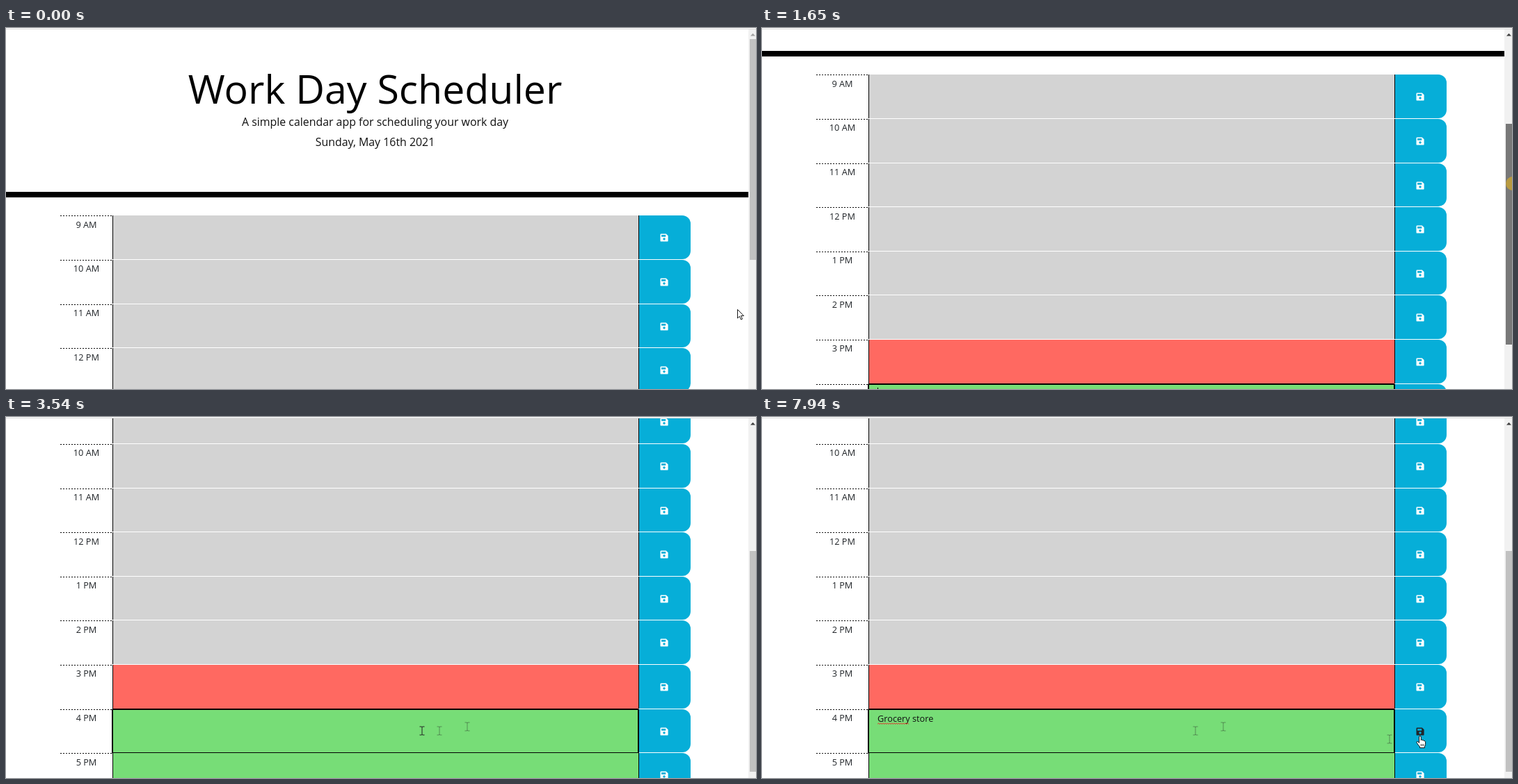
Write an HTML page that moves like this. It is 1078x520 px and loops after 8000 ms.

```html
<!DOCTYPE html>
<html lang="en">
<head>
<meta charset="utf-8">
<title>Work Day Scheduler</title>
<style>
  html, body { margin: 0; width: 100%; height: 100%; overflow: hidden; background: #fff; }
  body, body * { box-sizing: border-box; }
  #stage {
    position: relative; width: 1078px; height: 520px; overflow: hidden;
    font: 12.72px "Open Sans", sans-serif; color: #212529;
  }
  #stage div, #stage svg, #stage i { position: absolute; }
  #edge { left: 0; top: 1px; width: 100%; height: 1px; background: #dcdcdc; }
  #view { left: 0; top: 2px; width: 1067px; bottom: 0; overflow: hidden; }
  #page { left: 0; width: 1067px; height: 900px; }
  .head { width: 1061px; left: 0; text-align: center; white-space: nowrap; color: #111; }
  .title { top: 48px; font-size: 57.2px; line-height: 78px; color: #000; }
  .sub { font-size: 15.9px; line-height: 22px; }
  .bar { top: 236px; width: 100%; height: 8px; background: #000; }

  .row { left: 0; width: 100%; height: 62.6px; }
  .hour {
    left: 78px; top: 0; width: 75px; height: 100%; padding-top: 4.4px;
    text-align: center; line-height: 17.3px;
  }
  .hour::before {
    content: ""; position: absolute; left: 0; top: 0; width: 100%; height: 1px;
    background: repeating-linear-gradient(90deg, #000 0 2.4px, #0000 2.4px 4px);
  }
  .field { left: 153px; top: 0; width: 757px; height: 100%; border: solid #000; border-width: 0 1px; }
  .past { background: #d3d3d3; }
  .present { background: #ff6961; }
  .future { background: #77dd77; }
  .save { left: 910px; top: 0; width: 74px; height: 100%; border-radius: 0 12px 12px 0; background: #06aed8; }
  .save svg { left: 30px; top: 26px; fill: #fff; }
  .focus { left: 152px; top: -1px; width: 758px; height: 65px; border: 2px solid #000; border-radius: 2px; }
  #stage .entry { left: 166px; top: 5.4px; display: flex; white-space: pre; line-height: 17.3px; color: #111; }
  #stage #caret { position: static; width: 1px; height: 17px; background: #000; }
  #wave { left: 166px; top: 18px; fill: none; stroke: #e22; stroke-width: .9; }

  #track { left: 1067px; top: 2px; width: 11px; bottom: 0; background: #f1f1f1; }
  #up { left: 3px; top: 5px; }
  #thumb { left: 2px; width: 9px; height: 318px; }
  #press { left: 1069px; width: 20px; height: 20px; border-radius: 50%; background: rgba(226, 176, 28, .6); }
  .cursor { overflow: visible; }
</style>
</head>
<body>
<div id="stage">
  <div id="view">
    <div id="page">
      <div class="head title">Work Day Scheduler</div>
      <div class="head sub" style="top:124px">A simple calendar app for scheduling your work day</div>
      <div class="head sub" style="top:153px">Sunday, May 16th 2021</div>
      <div class="bar"></div>
    </div>
  </div>
  <div id="track">
    <svg id="up" width="7" height="5"><path d="M0 4.5 3.5 .8 7 4.5z"/></svg>
    <div id="thumb"></div>
  </div>
  <div id="press"></div>
  <div id="edge"></div>
</div>
<script>
const LOOP = 8000;
const $ = id => document.getElementById(id);
const stage = $('stage'), page = $('page');

// Rows
const disk = `<svg width="12" height="12" viewBox="0 0 12 12"><path fill-rule="evenodd"
  d="M1.6.5H8.8L11.6 3.2V10.4Q11.6 11.6 10.4 11.6H1.6Q.5 11.6 .5 10.4V1.6Q.5 .5 1.6 .5z
  M2.1 2.1V4.7H8.2V2.1z M6 6.2a1.7 1.7 0 1 0 .01 0z"/></svg>`;
const zigzag = 'M0 3.6' + 'l1.6 -1.8l1.6 1.8'.repeat(14);
const entry = `<div class="focus"></div>
  <div class="entry"><span id="typed"></span><i id="caret"></i></div>
  <svg id="wave" width="47" height="6"><path d="${zigzag}"/></svg>`;

for (let i = 0; i < 9; i++) {
  const hour = (i + 8) % 12 + 1, state = i < 6 ? 'past' : i < 7 ? 'present' : 'future';
  page.insertAdjacentHTML('beforeend', `<div class="row" style="top:${(270.4 + 63.6 * i).toFixed(1)}px">
    <div class="hour">${hour} ${i < 3 ? 'AM' : 'PM'}</div>
    <div class="field ${state}"></div>
    <div class="save" ${i === 7 ? 'id="target"' : ''}>${disk}</div>
    ${i === 7 ? entry : ''}</div>`);
}

// Pointers, each drawn around its hot spot
const shapes = {
  arrow: '<path d="M.5 .5V13L3.4 10.3 5.4 15 7.4 14.1 5.4 9.6H9.4z" fill="#fff" stroke="#000" stroke-width=".9"/>',
  beam: '<path d="M-3.5 -6H-1Q0 -6 0 -5Q0 -6 1 -6H3.5M0 -5V5M-3.5 6H-1Q0 6 0 5Q0 6 1 6H3.5" fill="none" stroke="#222"/>',
  hand: `<path d="M-1.5 1Q-1.5 -.5 -.2 -.5T1.2 1V5.5Q1.4 4.7 2.4 4.8T3.6 6Q4 5.4 4.8 5.6T5.8 6.9
    Q6.3 6.4 7 6.8T7.6 8V11.5Q7.6 13.2 6.4 14.6V16.5H-.5V15Q-2.6 12.8 -4.6 9.6Q-5.6 7.8 -4.4 7.4
    Q-3.4 7 -1.5 9.4z" fill="#fff" stroke="#000" stroke-width=".9"/>
    <path d="M1.2 11V14M3.1 11V14M5 11V14" stroke="#000" stroke-width=".7"/>`
};
function pointer(kind, x = 0, y = 0, opacity = 1) {
  stage.insertAdjacentHTML('beforeend', `<svg class="cursor" width="1" height="1"
    style="left:${x}px;top:${y}px;opacity:${opacity}">${shapes[kind]}</svg>`);
  return stage.lastElementChild;
}
const ghosts = [[2960, 662.5, 446], [3080, 622.5, 452], [7460, 901.5, 464]]
  .map(([t, x, y]) => [t, pointer('beam', x, y, .42)]);
const pointers = {};
for (const kind in shapes) pointers[kind] = pointer(kind);

// Timelines: [time, value...], each value held until the next
const scroll = [[0, 0],
  [980, 12], [1050, 44], [1120, 88], [1190, 130], [1250, 160], [1320, 176.5],
  [1510, 181], [1580, 190], [1650, 203], [1720, 219], [1790, 235.3], [1860, 250],
  [1930, 265], [2000, 279], [2070, 291], [2140, 294], [2200, 295]];
const caret = [[0, 1], [2270, 0], [3010, 1], [3540, 0], [3670, 1], [4680, 0], [4880, 1],
  [6830, 0], [7360, 1], [7940, 0]];
const thumb = [[0, '#c1c1c1'], [690, '#a8a8a8'], [760, '#787878'], [2270, '#a8a8a8'], [2460, '#c1c1c1']];
const cursor = [[0, 'arrow', 1051, 405], [70, ''],
  [2550, 'arrow', 1020, 440], [2640, 'beam', 880, 442], [2730, 'beam', 780, 443],
  [2820, 'beam', 710, 444], [2890, 'beam', 662.5, 446], [2960, 'beam', 622.5, 452],
  [3080, 'beam', 597.5, 452],
  [7110, 'beam', 603.5, 452], [7180, 'beam', 645.5, 453], [7250, 'beam', 725.5, 456],
  [7320, 'beam', 820.5, 460], [7390, 'beam', 901.5, 464], [7460, 'hand', 964, 478],
  [7530, 'arrow', 996, 495], [7600, 'arrow', 992, 492], [7670, 'hand', 975, 484],
  [7740, 'hand', 960, 474], [7800, 'hand', 951, 465], [7870, 'hand', 947, 461],
  [7940, 'hand', 945.5, 459.5]];
const text = 'Grocery store';
const keys = [3670, 4020, 4150, 4880, 5080, 5280, 5380, 5470, 5610, 5910, 5970, 6170, 6300];

const at = (track, t) => track.findLast(k => k[0] <= t).slice(1);
const show = (el, on) => { el.style.visibility = on ? 'visible' : 'hidden'; };
const icon = $('target').firstElementChild;

function draw(t) {
  const [y] = at(scroll, t), [kind, cx, cy] = at(cursor, t);
  page.style.top = -2 - y + 'px';
  $('thumb').style.top = 14 + y * .6 + 'px';
  $('thumb').style.background = at(thumb, t)[0];
  $('up').style.fill = y ? '#404040' : '#a3a3a3';

  show($('press'), t >= 760 && t < 2270);
  $('press').style.top = 92 + y * .6 + 'px';

  $('typed').textContent = text.slice(0, keys.filter(k => k <= t).length);
  show($('caret'), at(caret, t)[0]);
  show($('wave'), t >= 7110);

  for (const k in pointers) show(pointers[k], k === kind);
  if (kind) {
    pointers[kind].style.left = cx + 'px';
    pointers[kind].style.top = cy + 'px';
  }
  for (const [start, el] of ghosts) show(el, t >= start);
  icon.style.fill = kind === 'hand' ? '#212529' : '#fff';
}

const origin = performance.now();
function tick() {
  draw((performance.now() - origin) % LOOP);
  requestAnimationFrame(tick);
}
tick();
</script>
</body>
</html>
```
